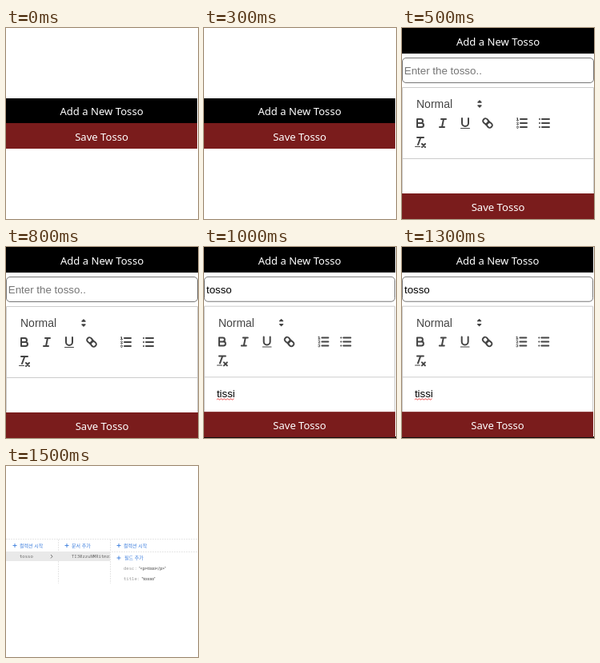
Write an HTML page that moves like this. It is 240 by 239 pixels and loops after 2000 ms.

```html
<!DOCTYPE html>
<html lang="ko">
<head>
<meta charset="utf-8">
<title>Tosso editor</title>
<style>
html, body { margin: 0; width: 100%; height: 100%; overflow: hidden; background: #fff; }
svg { display: block; }
.scene { visibility: hidden; animation: show 2s step-end infinite; }
.s2 { animation-delay: -1.5s; }
.s3 { animation-delay: -1s; }
.s4 { animation-delay: -.5s; }
@keyframes show {
  0% { visibility: visible; }
  25%, 100% { visibility: hidden; }
}
.btn { font: 500 13.1px "Noto Sans", "Open Sans", sans-serif; fill: #fff; text-anchor: middle; }
.ui { font: 13.33px "Liberation Sans", Arial, sans-serif; }
.format { font-size: 14px; fill: #444; }
.hint { fill: #757575; }
.icons { fill: none; stroke: #444; stroke-width: 2; stroke-linecap: round; stroke-linejoin: round; }
.thin { stroke-width: 1; }
.solid { fill: #444; stroke: none; }
.ko { font: 6px "Noto Sans CJK KR", "Noto Sans CJK", sans-serif; fill: #3b7ddd; }
.mono { font: 5.6px "Noto Sans Mono", monospace; fill: #666; }
.key { fill: #999; }
.val { font: 5.6px Roboto, sans-serif; fill: #444; }
.plus { fill: none; stroke: #3b7ddd; stroke-width: .9; }
.rule { fill: none; stroke: #e6e6e6; stroke-dasharray: 2 1; }
</style>
</head>
<body>
<svg width="240" height="239" viewBox="0 0 240 239">
  <defs>
    <path id="plus" class="plus" d="M-2.5 0h5M0-2.5v5"/>
    <clipPath id="cell"><rect x="65" y="107" width="65" height="12"/></clipPath>

    <g id="icons" class="icons">
      <g transform="translate(88 86)"><path fill="#444" stroke-width="1.4" d="M7 11l2 2 2-2zM7 7l2-2 2 2z"/></g>
      <g transform="translate(14 110)"><path d="M5 4h4.5a2.5 2.5 0 0 1 0 5H5zM5 9h5.5a2.5 2.5 0 0 1 0 5H5z"/></g>
      <g transform="translate(42 110)"><path d="M7 4h6M5 14h6M8 14L10 4"/></g>
      <g transform="translate(70 110)">
        <path d="M5 3v6a4 4 0 0 0 8 0V3"/>
        <rect class="solid" x="3" y="15" width="12" height="1" rx=".5"/>
      </g>
      <g transform="translate(98 110)">
        <path d="M7 11l4-4"/>
        <path id="ring" d="M8.9 4.58a3.48 3.48 0 0 1 .36 4.68A3.48 3.48 0 0 1 4.58 8.9C3.19 7.5 2.04 6.4 4.22 4.22S7.5 3.19 8.9 4.58z"/>
        <use href="#ring" transform="rotate(180 9 9)"/>
      </g>
      <g transform="translate(141 110)">
        <path d="M7 4h8M7 9h8M7 14h8"/>
        <path class="thin" d="M2.5 3l1-.5v3M2.5 5.5h2M4.5 10.5h-2c0-.23 1.85-1.08 1.85-2.23a.96.96 0 0 0-1.85-.11M2.5 14.85a.96.96 0 0 0 1.85-.11.7.7 0 0 0-.6-.74.7.7 0 0 0 .6-.74.96.96 0 0 0-1.85-.1"/>
      </g>
      <g transform="translate(169 110)"><path d="M6 4h9M6 9h9M6 14h9M3 4h.01M3 9h.01M3 14h.01"/></g>
      <g transform="translate(14 134)">
        <path d="M5 3h8M6 12L9.35 3M11 15l4-4M15 15l-4-4"/>
        <rect class="solid" x="2" y="14" width="7" height="1" rx=".5"/>
      </g>
    </g>

    <g id="editor">
      <rect width="240" height="239" fill="#fff"/>
      <rect width="240" height="32" fill="#000"/>
      <text class="btn" x="120" y="22">Add a New Tosso</text>
      <rect x=".5" y="37.5" width="239" height="31" rx="4.5" fill="#fff" stroke="#767676"/>
      <path d="M.5 207V74.5h239V207M0 163.5h240" fill="none" stroke="#ccc"/>
      <text class="ui format" x="18" y="100">Normal</text>
      <use href="#icons"/>
      <rect y="207" width="240" height="32" fill="#7a1c1c"/>
      <text class="btn" x="120" y="229">Save Tosso</text>
    </g>
  </defs>

  <g class="scene s1">
    <rect y="88" width="239" height="31" fill="#000"/>
    <rect y="119" width="239" height="32" fill="#7a1c1c"/>
    <text class="btn" x="119.5" y="109">Add a New Tosso</text>
    <text class="btn" x="119.5" y="141">Save Tosso</text>
  </g>

  <g class="scene s2">
    <use href="#editor"/>
    <text class="ui hint" x="2.8" y="58">Enter the tosso..</text>
  </g>

  <g class="scene s3">
    <rect y="237" width="240" height="2" fill="#000"/>
    <g transform="scale(.996)">
      <use href="#editor"/>
      <text class="ui" x="3" y="58">tosso</text>
      <text class="ui" x="16" y="189">tissi</text>
      <path d="M16 192l1.5-1.5 2 1.5 2-1.5 2 1.5 2-1.5 2 1.5 2-1.5 2 1.5 2-1.5 2 1.5 2-1.5" fill="none" stroke="#e33" stroke-width=".9"/>
    </g>
  </g>

  <g class="scene s4">
    <path class="rule" d="M0 91.5h240M0 107.5h240M65.5 92v55M130.5 92v55"/>
    <path d="M0 107h130v12H0z" fill="#e9e9e9"/>
    <use href="#plus" x="11" y="99.5"/>
    <text class="ko" x="17" y="101.5">컬렉션 시작</text>
    <use href="#plus" x="76" y="99.5"/>
    <text class="ko" x="82" y="101.5">문서 추가</text>
    <use href="#plus" x="141" y="99.5"/>
    <text class="ko" x="147" y="101.5">컬렉션 시작</text>
    <use href="#plus" x="141" y="115"/>
    <text class="ko" x="148" y="117">필드 추가</text>
    <text class="mono" x="17" y="115">tosso</text>
    <path d="M56 111l2 2.2-2 2.2" fill="none" stroke="#555" stroke-width=".8"/>
    <g clip-path="url(#cell)"><text class="mono" x="82" y="115">TI30zzuNMRitmrx</text></g>
    <text class="mono key" x="147" y="130">desc:</text>
    <text class="val" x="166" y="130">"&lt;p&gt;tissi&lt;/p&gt;"</text>
    <text class="mono key" x="147" y="143">title:</text>
    <text class="val" x="169.5" y="143">"tosso"</text>
  </g>
</svg>
</body>
</html>
```
